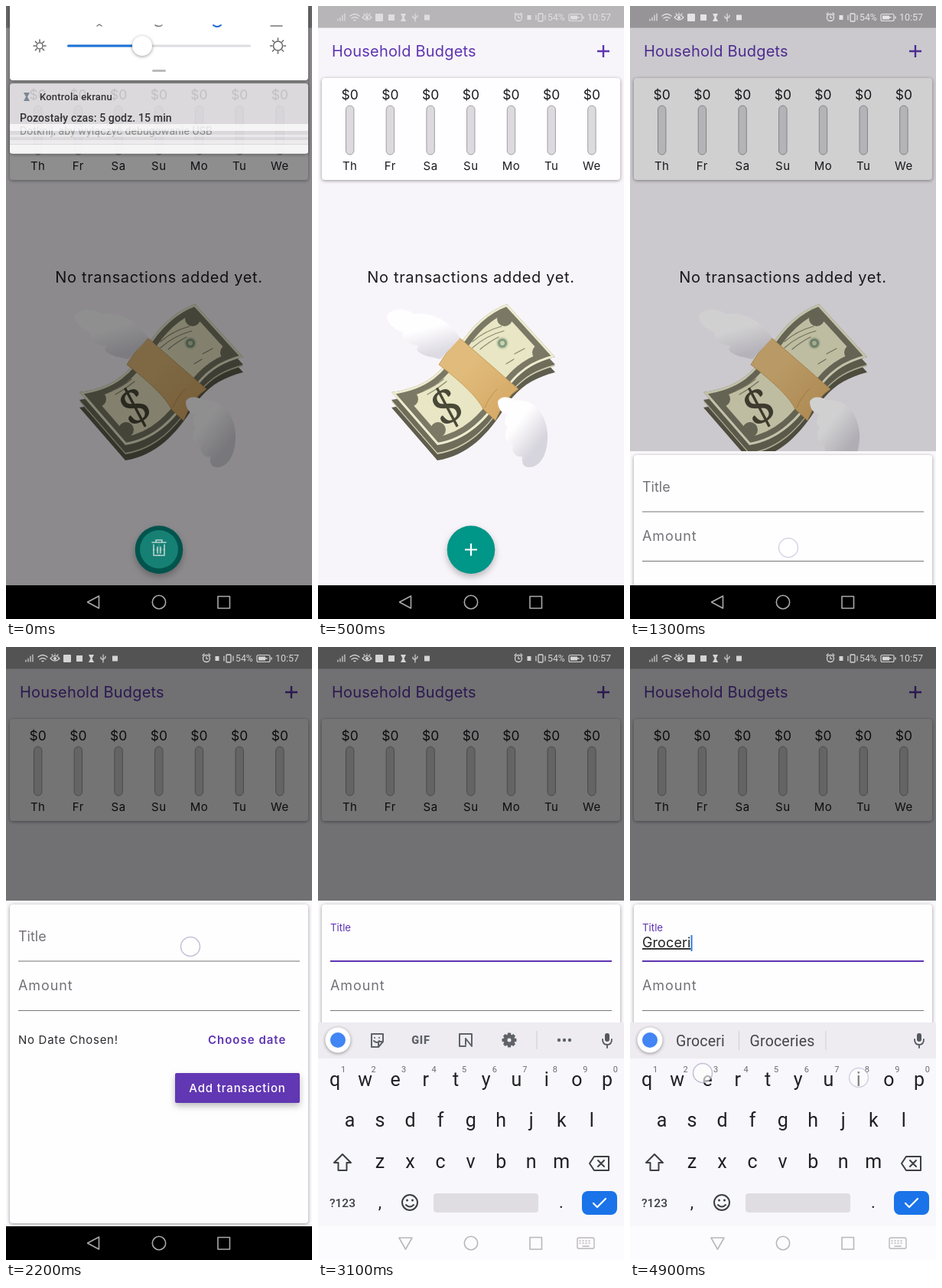
Recreate the animation shown at these times as an HTML page. Size 400 px wide and 800 px high, loop 5000 ms.

```html
<!DOCTYPE html>
<html lang="en">
<head>
<meta charset="utf-8">
<title>Budget app</title>
<style>
html, body { margin: 0; width: 100%; height: 100%; overflow: hidden; background: #f8f5fa; }
svg { display: block; width: 100vw; height: 100vh; }
text { font-family: Inter, "Open Sans", sans-serif; fill: #1c1b1f; }
.sys text { font-family: Roboto, "Noto Sans", sans-serif; }
.mid { text-anchor: middle; }
.line { fill: none; stroke-linecap: round; stroke-linejoin: round; }
.card { filter: drop-shadow(0 1px 2px #0006); }
.raised { filter: drop-shadow(0 4px 4px #0004); }
</style>
</head>
<body>
<svg id="stage" viewBox="0 0 400 800"></svg>
<script>
const LOOP = 5000, STEP = 100;
const PURPLE = '#5e35b1', KEY = '#202124';

const rect = (x, y, w, h, fill, r = 0, more = '') =>
  `<rect x="${x}" y="${y}" width="${w}" height="${h}" rx="${r}" fill="${fill}" ${more}/>`;
const circle = (x, y, r, fill, more = '') =>
  `<circle cx="${x}" cy="${y}" r="${r}" fill="${fill}" ${more}/>`;
const line = (d, color, w = 1.5, more = '') =>
  `<path class="line" d="${d}" stroke="${color}" stroke-width="${w}" ${more}/>`;
const shape = (d, fill, more = '') => `<path d="${d}" fill="${fill}" ${more}/>`;
const text = (x, y, size, s, more = '') => `<text x="${x}" y="${y}" font-size="${size}" ${more}>${s}</text>`;
const group = (id, body, more = '') => `<g id="${id}" ${more}>${body}</g>`;
const ink = (color, weight = 400, gap = 0) =>
  `style="fill:${color};font-weight:${weight};letter-spacing:${gap}px"`;
const plus = (x, y, r, color, w) => line(`M${x - r} ${y}h${2 * r}M${x} ${y - r}v${2 * r}`, color, w, 'style="stroke-linecap:butt"');

function week() {
  return ['Th', 'Fr', 'Sa', 'Su', 'Mo', 'Tu', 'We'].map((day, i) => {
    const x = 41.7 + 52.7 * i;
    return text(x, 121.5, 17.5, '$0', 'class="mid"') +
      rect(x - 5.2, 130, 10.4, 64, '#dcdade', 5.2, 'stroke="#a09ea4"') +
      text(x, 213.5, 15, day, `class="mid" ${ink('#1c1b1f', 400, 0.5)}`);
  }).join('');
}

const BILL = 'M96 504C150 497 165 470 182 447C200 418 222 398 247 389L310 458C280 466 262 478 245 503C222 540 195 567 156 573Z';

function money() {
  const notches = [[121, 513], [157, 553], [244, 408], [290, 452]];
  const face = shape(BILL, '#e8e6c4') +
    notches.map(([x, y]) => circle(x, y, 10, '#7b7965')).join('') +
    line(BILL, '#7b7965', 21) + line(BILL, '#eeedd0', 6);
  return shape(BILL, '#5f5d4d', 'transform="translate(0 20)"') +
    shape(BILL, '#cfccb0', 'transform="translate(0 12)"') +
    shape(BILL, '#6f6d5a', 'transform="translate(0 10)"') +
    `<g clip-path="url(#bill)">${face}</g>` +
    line('M202 438Q218 424 240 418M202 446Q220 430 243 424M212 448Q224 438 236 432M246 467L256 461M257 454L270 447M138 502Q152 497 164 487M143 507Q156 500 168 490', '#8a8870', 1.2) +
    circle(241, 440, 8, '#cdd0ae') + circle(241, 440, 6, '#7f9c80') + circle(241, 440, 3, '#cdd0ae') +
    text(0, 25, 68, '$', `class="mid" transform="translate(168 522) rotate(-28)" style="font-family:'Noto Serif',serif;font-weight:400;fill:#4a4838"`) +
    shape('M185 433L262 500Q245 510 232 541L216 526Q206 505 158 468Q172 445 185 433Z', 'url(#band)', 'stroke="#c0934f" stroke-width=".8"') +
    line('M218 524Q224 510 234 500', '#c0934f', 1) +
    shape('M90 404C98 393 116 395 126 402C151 398 174 414 186 433L160 461C148 458 138 457 131 451C128 449 130 445 132 443C122 443 108 437 111 426C101 423 90 414 90 404Z', 'url(#wingA)') +
    shape('M235 516C239 509 249 509 258 515C280 512 298 530 300 558C301 584 291 602 276 602C268 602 266 596 267 588C258 590 252 580 255 573C244 571 243 559 248 549C242 547 244 537 248 532C241 533 235 526 235 516Z', 'url(#wingB)');
}

function statusIcons() {
  const c = '#fff';
  return line('M26 19v-2M29 19v-4M32 19v-7M35 19v-9', c, 1.2) +
    line('M42 13q6-5 12 0M44 16q4-3 8 0M47 18.5h2', c, 1.4) +
    line('M58 15q6-7 12 0q-6 6-12 0M60 10l1 1M64 9v1M68 10l-1 1', c, 1.2) + circle(64, 15, 2, c) +
    rect(75, 10, 10, 10, c, 1) + rect(92, 11, 8, 8, c) +
    shape('M108 10h7l-2.500 5 2.500 5h-7l2.500-5z', c) +
    line('M127 10v10M124 13v2l3 2M130 12v2l-3 2', c, 1.2) + rect(139, 11.5, 7, 7, c) +
    circle(262, 15, 4.5, 'none', 'stroke="#fff" stroke-width="1.300"') +
    line('M262 12.500v3h2M257 11l2-2M267 11l-2-2', c, 1.2) + rect(273.5, 12, 5, 6, c) +
    rect(288, 10, 6, 10, 'none', 1, 'stroke="#fff" stroke-width="1.300"') +
    line('M285 12v6M297 12v6', c, 1.2) +
    text(300, 19, 12.3, '54%', ink(c)) +
    rect(328, 10.5, 17, 9, 'none', 2, 'stroke="#fff" stroke-width="1.200"') +
    rect(330, 12.5, 9, 5, c) + line('M347 14v2M334 15h7', c, 1.4) +
    text(352, 19, 12.5, '10:57', ink(c));
}

function sheet() {
  return rect(0, 331, 400, 470, '#faf8fb') +
    rect(5, 336, 390, 416, '#fffeff', 4, 'class="card"') +
    text(16, 384, 18, 'Title', 'id="label"') +
    text(16, 392, 18, '', `id="entry" text-decoration="underline" ${ink('#222', 400, 0.1)}`) +
    rect(0, 376, 2, 21, '#2f7de1', 0, 'id="caret"') +
    rect(16, 409.5, 368, 1, '#777', 0, 'id="rule"') +
    text(16, 448, 18, 'Amount', ink('#747277', 400, 0.9)) +
    rect(16, 474, 368, 1, '#777') +
    text(16, 518, 15, 'No Date Chosen!', ink('#2b2a2e', 400, 0.7)) +
    text(264, 518, 15, 'Choose date', ink(PURPLE, 600, 1)) +
    rect(221, 556, 163, 39, '#6237b3', 2, 'class="raised"') +
    text(302.5, 581, 15, 'Add transaction', `class="mid" ${ink('#fff', 500, 0.85)}`);
}

// Key rows: letters, first centre, baseline
const ROWS = [['qwertyuiop', 22, 573], ['asdfghjkl', 41.5, 626], ['zxcvbnm', 81, 680]];
const keyPos = {};
for (const [letters, x0, y] of ROWS)
  [...letters].forEach((ch, i) => keyPos[ch] = [x0 + 39.55 * i, y]);

function toolbar() {
  const c = '#5f6368';
  const teeth = Array.from({ length: 8 }, (_, i) =>
    rect(247.8, 503.5, 4.4, 5, c, 1, `transform="rotate(${45 * i} 250 513)"`)).join('');
  return line('M70 505h15v10l-6 7h-9zM85 515h-6v7M74 510h0M80 510h0M73 514q4 4 7 0', c, 2) +
    text(134.5, 518, 14.5, 'GIF', `class="mid" ${ink(c, 800, 0.8)}`) +
    line('M201 513v-8h-16v16h8M193 511l8 10v-9M193 511v8', c, 2) +
    teeth + circle(250, 513, 5, 'none', `stroke="${c}" stroke-width="5"`) +
    rect(285.5, 501, 1, 24, '#d0ced4') +
    [315, 322, 329].map(x => circle(x, 513, 2.2, c)).join('');
}

function keyboard() {
  const letters = Object.entries(keyPos).map(([ch, [x, y]]) =>
    text(x, y, 25, ch, `class="mid key" ${ink(KEY)}`)).join('');
  const digits = [...'1234567890'].map((d, i) =>
    text(33 + 39.55 * i, 555, 11, d, `class="mid" ${ink('#6d6b72')}`)).join('');
  const words = [92, 199, 305].map(x =>
    text(x, 520.5, 19.5, '', `class="mid word" ${ink('#45464a', 400, 0.2)}`)).join('');
  return rect(0, 490, 400, 311, '#f8f7fb') + rect(0, 490, 400, 47, '#eeecf1') +
    circle(26, 513, 16.5, '#fff', 'class="card"') + circle(26, 513, 10, '#4285f4') +
    group('tools', toolbar()) +
    group('words', words + rect(142, 501, 1, 25, '#cfcdd3') + rect(255.5, 501, 1, 25, '#cfcdd3')) +
    rect(375, 504, 6, 11, '#55585d', 3) + line('M372 512q0 7 6 7t6-7M378 519v4', '#55585d', 1.8) +
    letters + digits +
    line('M32 662l11 11h-5.500v10h-11v-10h-5.500z', '#3c4043', 2, 'id="shift"') +
    line('M361 665h19v18h-19l-6-9zM366 670l8 8M374 670l-8 8', '#3c4043', 2) +
    text(32, 731, 15.5, '?123', `class="mid" ${ink('#3c4043', 500)}`) +
    text(81, 732, 22, ',', `class="mid" ${ink(KEY)}`) +
    circle(120, 725, 10, 'none', 'stroke="#3c4043" stroke-width="2"') +
    circle(116.5, 722, 1.5, '#3c4043') + circle(123.5, 722, 1.5, '#3c4043') +
    line('M115 728q5 5 10 0', '#3c4043', 2) +
    rect(151, 713, 137, 25, '#dfdde1', 4) +
    text(318, 732, 22, '.', `class="mid" ${ink(KEY)}`) +
    rect(345, 710, 46, 31, '#1a73e8', 8) + line('M360 726l5 5 11-11', '#fff', 2.2);
}

function popup() {
  return rect(-22, -105, 44, 121, '#f1eff4', 4, 'class="card"') +
    text(0, -64, 30, '', `class="mid" id="popLetter" ${ink('#111')}`) +
    text(11, -52, 15, '...', `class="mid" id="popMore" ${ink('#333', 700)}`);
}

function navBar() {
  return rect(0, 756, 400, 44, '#000', 0, 'id="navBack"') +
    `<g id="navIcons" class="line" stroke-width="1.600"><path id="back"/><circle cx="200" cy="778" r="8.700"/><rect x="277" y="770.500" width="15.500" height="15.500"/></g>` +
    group('navKeys', rect(339, 771, 22, 14, 'none', 2, 'stroke="#b9b7bc" stroke-width="1.400"') +
      line('M342 775h16M342 778h16', '#b9b7bc', 1.6, 'stroke-dasharray="1 3"') + line('M346 782h8', '#b9b7bc', 1.5));
}

function sun(x, y, r) {
  const ray = i => `<path class="line" d="M${x} ${y - r - 1.5}v-2.500" stroke="#666" stroke-width="1.500" transform="rotate(${45 * i} ${x} ${y})"/>`;
  return circle(x, y, r, 'none', 'stroke="#666" stroke-width="1.500"') + [...Array(8).keys()].map(ray).join('');
}

function shade() {
  const soft = (y, h, a) => rect(5, y, 390, h, '#fff', 1, `opacity="${a}"`);
  return rect(5, 101, 390, 92, '#eeecf0', 4, 'opacity=".8" class="card"') +
    shape('M23 113h8l-3 5.500 3 5.500h-8l3-5.500z', '#7d8794') +
    text(44, 123, 13, 'Kontrola ekranu', ink('#333', 500, 0.2)) +
    text(18, 150.5, 14.1, 'Pozostały czas: 5 godz. 15 min', ink('#333', 500, 0.1)) +
    text(18, 167.5, 14, 'Dotknij, aby wyłączyć debugowanie USB', ink('#888', 400, 0.1)) +
    soft(154, 9, 0.75) + soft(168, 3, 0.4) + soft(175, 5, 0.5) + soft(181, 11, 0.75) +
    shape('M5 0H395V93a4 4 0 0 1-4 4H9a4 4 0 0 1-4-4z', '#fff', 'class="card"') +
    line('M119 26l3-2 3 2M195 25q5 3 9 0M346 26h15', '#777', 1.5) + line('M271 25q5 4 10 0', '#1a66d6', 2) +
    sun(44, 52, 4) + sun(355.5, 52, 6) +
    rect(80, 50.5, 240, 3, '#dedee2', 1.5) + rect(80, 50.5, 98, 3, '#1a73d8', 1.5) +
    circle(178, 52, 13, '#fff', 'class="card"') + rect(191, 83, 18, 3, '#bbb', 1.5);
}

const grad = (id, x2, y2, a, b, from = 0.35) =>
  `<linearGradient id="${id}" x2="${x2}" y2="${y2}"><stop offset="${from}" stop-color="${a}"/><stop offset="1" stop-color="${b}"/></linearGradient>`;

document.getElementById('stage').innerHTML =
  `<defs>${grad('band', 1, 1, '#e1bb7b', '#d3a562')}${grad('wingA', 0.4, 1, '#fffeff', '#dcdae2', 0.5)}${grad('wingB', 0.7, 0.8, '#fffeff', '#d6d4dc', 0.5)}<clipPath id="bill"><path d="${BILL}"/></clipPath></defs>` +
  rect(0, 0, 400, 800, '#f8f5fa') + rect(0, 0, 400, 28.5, '#b7b5b8') +
  text(18, 66, 20, 'Household Budgets', ink(PURPLE, 400, 0.2)) + plus(373, 59, 8, PURPLE, 2.4) +
  rect(5, 94, 390, 133, '#fefdff', 4, 'class="card"') + week() +
  text(200, 361, 20, 'No transactions added yet.', `class="mid" ${ink('#1c1b1f', 400, 0.65)}`) +
  money() + circle(200, 709.6, 31.3, '#009688', 'class="raised"') + plus(200, 709.5, 8, '#fff', 2.2) +
  rect(0, 0, 400, 757, '#000', 0, 'id="scrim"') +
  group('sheet', sheet()) +
  group('status', statusIcons(), 'class="sys"') +
  group('trash', circle(200, 709, 25, '#1c8c7e') +
    line('M191 700h18M196 700v-3h8v3M193 703v14h14v-14M198 706v8M202 706v8', '#e8f2f0', 1.6)) +
  group('keyboard', keyboard(), 'class="sys"') +
  group('popup', popup(), 'class="sys"') +
  navBar() +
  group('smear', rect(0, 60, 400, 34, '#8a888c', 0, 'opacity=".2"') + rect(0, 82, 400, 10, '#8a888c', 0, 'opacity=".2"') +
    text(18, 80, 14, 'Kalendarz domowy, zakupy w sklepie online. Al...', ink('#eee', 400, 0.2)), 'class="sys"') +
  group('shade', shade(), 'class="sys"') + group('touches', '');

const $ = id => document.getElementById(id);
const set = (id, attrs) => { for (const k in attrs) $(id).setAttribute(k, attrs[k]); };
const show = (id, on) => set(id, { visibility: on ? 'visible' : 'hidden' });

// Piecewise linear value from [time, value] pairs
function at(t, ...keys) {
  let [t0, v0] = keys[0];
  for (const [t1, v1] of keys) {
    if (t < t1) return t <= t0 ? v0 : v0 + (v1 - v0) * (t - t0) / (t1 - t0);
    [t0, v0] = [t1, v1];
  }
  return v0;
}

// x, y, down, up, key
const TAPS = [
  [207, 707, 1000, 1200], [241, 391, 2100, 2200], [34, 672, 3200, 3200],
  [197, 614, 3400, 3500, 'g'], [136, 560, 3600, 3700, 'r'], [345, 555, 3800, 3800, 'o'],
  [151, 677, 3900, 4100, 'c'], [95, 556, 4300, 4300, 'e'], [136, 560, 4500, 4500, 'r'],
  [299, 562, 4700, 4800, 'i'], [95, 556, 4900, 4900]
];

// Time, typed text, other suggestions
const TYPED = [
  [0, ''], [3600, 'G', 'Gdy', 'Go'], [3800, 'Gr', 'Gra', 'Grupa'], [3900, 'Gro', 'Grodzisk', 'Geo'],
  [4200, 'Groc', 'Groch', 'Grocie'], [4400, 'Groce', 'Grocery', 'Grace'],
  [4600, 'Grocer', 'Grocery', 'Grocers'], [4900, 'Groceri', 'Groceries', '']
];

function drawTyping(t) {
  const [, typed, ...others] = TYPED.filter(row => row[0] <= t).pop();
  const focus = t >= 2300, f = at(t, [2300, 0], [2500, 1]);
  set('label', { y: 384 - 13 * f, 'font-size': 18 - 4.7 * f });
  $('label').style.fill = focus ? PURPLE : '#747277';
  set('rule', focus ? { y: 409, height: 2, fill: PURPLE } : { y: 409.5, height: 1, fill: '#777' });
  $('entry').textContent = typed;
  set('caret', { x: 16 + (typed ? $('entry').getComputedTextLength() : 0) });
  show('caret', typed || (t >= 2600 && t < 3100));

  show('tools', !typed);
  show('words', typed);
  document.querySelectorAll('.word').forEach((el, i) => el.textContent = [typed, ...others][i] || '');
  const caps = t >= 3200 && t < 3600;
  document.querySelectorAll('.key').forEach(el => {
    el.textContent = caps ? el.textContent.toUpperCase() : el.textContent.toLowerCase();
  });
  $('shift').style.fill = caps ? '#3c4043' : 'none';

  const tap = TAPS.find(p => p[4] && t >= p[2] && t <= p[3]);
  show('popup', tap);
  show('popMore', tap && 'ceo'.includes(tap[4]));
  if (tap) {
    set('popup', { transform: `translate(${keyPos[tap[4]]})` });
    $('popLetter').textContent = caps ? tap[4].toUpperCase() : tap[4];
  }
}

function draw(t) {
  set('shade', {
    transform: `translate(0 ${at(t, [0, 0], [100, -95], [200, -135], [400, -175], [600, -210])})`,
    opacity: at(t, [0, 1], [100, 0.5], [300, 0.2], [500, 0])
  });
  set('smear', { opacity: at(t, [0, 0], [100, 1], [400, 0]) });
  set('trash', { opacity: at(t, [0, 0.8], [100, 0]) });
  set('scrim', { opacity: t < 1000 ? at(t, [0, 0.44], [100, 0]) : at(t, [1200, 0], [1500, 0.54]) });
  set('status', { opacity: t < 1000 ? at(t, [200, 0], [600, 0.75]) : 0.75 });
  set('sheet', { transform: `translate(0 ${at(t, [1200, 426], [1300, 250], [1400, 70], [1500, 0])})` });
  set('keyboard', { transform: `translate(0 ${at(t, [2300, 310], [2400, 250], [2500, 120], [2600, 30], [2700, 0])})` });

  const light = t >= 2400;
  set('navBack', { fill: light ? '#fcfbfd' : '#000' });
  set('navIcons', { stroke: light ? '#b9b7bc' : '#a9a9a9' });
  set('back', { d: light ? 'M106 771h17l-8.500 15z' : 'M121.500 770v16l-15-8z' });
  show('navKeys', light);
  drawTyping(t);

  $('touches').innerHTML = TAPS.filter(p => t >= p[2] && t < p[3] + 300).map(([x, y, , up]) =>
    circle(x, y, 12.5, '#fffc', `stroke="#b9b0cc" stroke-width="1.500" opacity="${at(t, [up, 0.8], [up + 300, 0])}"`)).join('');
}

const start = performance.now();
function tick() {
  const t = (performance.now() - start) % LOOP;
  draw(Math.floor(t / STEP) * STEP);
  requestAnimationFrame(tick);
}
draw(0);
tick();
</script>
</body>
</html>
```
